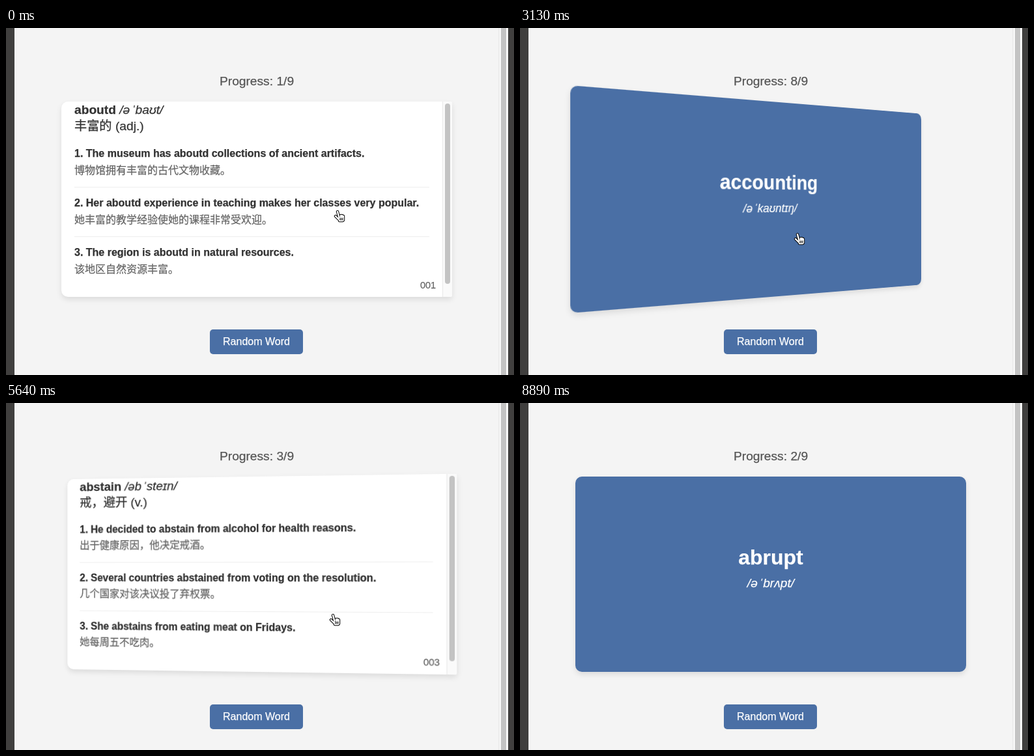
Recreate the animation shown at these times as an HTML page. Size 780 px wide and 533 px high, loop 9.18 s.

```html
<!DOCTYPE html>
<html lang="zh-CN">
<head>
<meta charset="utf-8">
<title>Word cards</title>
<style>
html, body { margin: 0; width: 100%; height: 100%; overflow: hidden; background: #f4f4f4; }
#stage { position: relative; width: 780px; height: 533px; overflow: hidden; }
svg { position: absolute; left: 0; top: 0; display: block; }
text {
  font-family: "Liberation Sans", Arial, "DejaVu Sans", "Noto Sans CJK SC", "Noto Sans CJK", sans-serif;
  white-space: pre; fill: currentColor; stroke: currentColor; stroke-width: .25px;
}
.face {
  position: absolute; left: 85px; top: 113px; width: 600px; height: 300px;
  border-radius: 10px; box-shadow: 0 4px 8px rgba(0, 0, 0, .1);
}
.face svg { border-radius: inherit; overflow: hidden; }
#front { background: #4a6fa5; color: #fff; }
#back { background: #fff; border-radius: 10px 3px 3px 10px; }
.mid { text-anchor: middle; }
.bold { font-weight: bold; }
.ipa { font-style: italic; font-weight: normal; }
.head { font-size: 19.2px; color: #333; }
.en { font-size: 16px; font-weight: bold; color: #333; }
.zh { font-size: 16px; color: #666; }
.no { font-size: 14.4px; color: #666; }
#progress { font-size: 19.2px; color: #555; }
#button { font-size: 16px; color: #fff; }
#word { font-size: 32px; }
#sound { font-size: 19.2px; }
</style>
</head>
<body>
<div id="stage">
  <svg width="780" height="533">
    <rect width="780" height="533" fill="#403f3e"/>
    <rect x="13" width="744" height="533" fill="#f4f4f4"/>
    <rect x="757" width="14" height="533" fill="#fafafa"/>
    <rect x="756.5" width="1" height="533" fill="#e2e2e2"/>
    <rect x="760" width="8" height="533" fill="#c3c3c3"/>
    <text id="progress" class="mid" x="385" y="88"></text>
    <rect x="313" y="463" width="143" height="38" rx="5" fill="#4a6fa5"/>
    <text id="button" class="mid" x="384.5" y="487">Random Word</text>
  </svg>
  <div class="face" id="front">
    <svg width="600" height="300">
      <text id="word" class="bold mid" x="300" y="135"></text>
      <text id="sound" class="ipa mid" x="300" y="170"></text>
    </svg>
  </div>
  <div class="face" id="back">
    <svg width="600" height="300">
      <g id="notes"></g>
      <rect x="585" width="15" height="300" fill="#fafafa"/>
      <rect x="585" width="1" height="300" fill="#e8e8e8"/>
      <rect id="thumb" x="589" y="3" width="8" height="277" rx="4" fill="#c3c3c3"/>
    </svg>
  </div>
  <svg width="780" height="533">
    <defs>
      <path id="fingers" d="M0 1L3 12M-3 8L2 13M5 7V14M7 7V14M9 8V14M3 15H8"/>
    </defs>
    <g id="hand" fill="none" stroke-linecap="round" stroke-linejoin="round">
      <use href="#fingers" stroke="#000" stroke-width="4.4"/>
      <use href="#fingers" stroke="#fff" stroke-width="2.4"/>
      <path d="M4 11V14M6 11V14M8 11V14" stroke="#000"/>
    </g>
    <path id="arrow" d="M.5 0V14.6L3.8 11.6 6.2 17 8.6 16 6.2 10.8H10.8Z" stroke="#fff"/>
  </svg>
</div>
<script>
const LOOP = 9180, STEP = 147.8, POSE_STEP = 148.6, FLIP = 600;
const $ = id => document.getElementById(id);

const words = {
  aboutd: { no: 1, ipa: '/əˈbaʊt/', mean: '丰富的 (adj.)', lines: [
    'The museum has aboutd collections of ancient artifacts.', '博物馆拥有丰富的古代文物收藏。',
    'Her aboutd experience in teaching makes her classes very popular.', '她丰富的教学经验使她的课程非常受欢迎。',
    'The region is aboutd in natural resources.', '该地区自然资源丰富。'] },
  accounting: { no: 8, ipa: '/əˈkaʊntɪŋ/', mean: '会计 (n.)', lines: [
    'She studied accounting at university.', '她在大学学习会计。',
    'The accounting department checks all the expenses.', '会计部门核对所有开支。',
    'Good accounting is important for every business.', '良好的会计工作对每个企业都很重要。'] },
  abstain: { no: 3, ipa: '/əbˈsteɪn/', mean: '戒，避开 (v.)', lines: [
    'He decided to abstain from alcohol for health reasons.', '出于健康原因，他决定戒酒。',
    'Several countries abstained from voting on the resolution.', '几个国家对该决议投了弃权票。',
    'She abstains from eating meat on Fridays.', '她每周五不吃肉。'] },
  accommodation: { no: 7, ipa: '/əˌkɒməˈdeɪʃn/' },
  abrupt: { no: 2, ipa: '/əˈbrʌpt/' }
};

// clicks on the button and on the card
const picks = { aboutd: 0, accounting: 2400, abstain: 4500, accommodation: 6750, abrupt: 7600 };
const flips = [1555, 3039, 3773, 5178, 5987];

// pointer moves between resting places
const rest = { x: 509, y: 281 };
const moves = [
  { from: 0, to: 450, x: 483, y: 278 },
  { from: 1635, to: 2230, x: 367, y: 483 },
  { from: 2675, to: 3150, x: 427, y: 314 },
  { from: 3720, to: 4380, x: 402, y: 484 },
  { from: 4755, to: 5180, x: 502, y: 325 },
  { from: 5940, to: 6536, x: 340, y: 484 },
  { from: 7880, to: 8470, x: 686, y: 420 },
  { from: 8470, to: 8900, x: 760, y: 560 }
];

const clamp = v => Math.min(1, Math.max(0, v));
const smooth = u => u * u * (3 - 2 * u);

// the CSS "ease" curve
function ease(t) {
  const bez = (s, a, b) => 3 * a * s * (1 - s) ** 2 + 3 * b * s * s * (1 - s) + s ** 3;
  let lo = 0, hi = 1;
  for (let i = 0; i < 24; i++) {
    const mid = (lo + hi) / 2;
    if (bez(mid, .25, .25) < t) lo = mid; else hi = mid;
  }
  return bez(hi, .1, 1);
}

// even flips turn to the front, odd ones to the back
function angleAt(t) {
  return flips.reduce((a, start, i) => {
    const p = t > start ? ease(clamp((t - start) / FLIP)) : 0;
    return a + (i % 2 ? 180 : -180) * p;
  }, 180);
}

function pointerAt(t) {
  return moves.reduce((p, m) => {
    const f = smooth(clamp((t - m.from) / (m.to - m.from)));
    return { x: p.x + (m.x - p.x) * f, y: p.y + (m.y - p.y) * f };
  }, rest);
}

const scrollAt = t => t < 740 || t > 1185 ? 0 : t < 1035 ? 18 : 9;
const inside = (p, l, t, r, b) => p.x >= l && p.x <= r && p.y >= t && p.y <= b;
const spaced = ipa => ipa.replace(/[ˈˌ]/g, m => `<tspan dx=".1em">${m}</tspan>`);

function notes(name) {
  const w = words[name];
  if (!w.lines) return '';
  let out = `<text class="head bold" x="20" y="19">${name} <tspan class="ipa">${spaced(w.ipa)}</tspan></text>` +
    `<text class="head" x="20" y="44">${w.mean}</text>`;
  for (let i = 0; i < 3; i++) {
    const y = 85 + 76 * i;
    out += `<text class="en" x="20" y="${y}">${i + 1}. ${w.lines[2 * i]}</text>` +
      `<text class="zh" x="20" y="${y + 25.5}">${w.lines[2 * i + 1]}</text>`;
    if (i < 2) out += `<rect x="20" y="${y + 46}" width="545" height="1" fill="#eee"/>`;
  }
  return out + `<text class="no" x="551" y="287">00${w.no}</text>`;
}

let shown;
function setWord(name) {
  if (name === shown) return;
  shown = name;
  $('progress').textContent = `Progress: ${words[name].no}/9`;
  $('word').textContent = name;
  $('sound').innerHTML = spaced(words[name].ipa);
  $('notes').innerHTML = notes(name);
}

function draw(t) {
  setWord(Object.keys(picks).filter(w => picks[w] <= t).pop());

  const a = angleAt(t), onFront = a < 90;
  $('front').style.visibility = onFront ? 'visible' : 'hidden';
  $('back').style.visibility = onFront ? 'hidden' : 'visible';
  $(onFront ? 'front' : 'back').style.transform =
    `perspective(1000px) rotateY(${(onFront ? a : a - 180).toFixed(3)}deg)`;

  const s = scrollAt(t);
  $('notes').setAttribute('transform', `translate(0 ${-s})`);
  $('thumb').setAttribute('y', 3 + s * 17 / 18);

  const p = pointerAt(t);
  const link = inside(p, 85, 113, 685, 413) || inside(p, 313, 463, 456, 501);
  for (const id of ['hand', 'arrow']) {
    $(id).setAttribute('transform', `translate(${Math.round(p.x)} ${Math.round(p.y)})`);
    $(id).style.display = (id === 'hand') === link ? '' : 'none';
  }
}

// the picture advances in even steps
function tick() {
  draw(Math.floor(performance.now() % LOOP / STEP) * POSE_STEP);
  requestAnimationFrame(tick);
}
tick();
</script>
</body>
</html>
```
